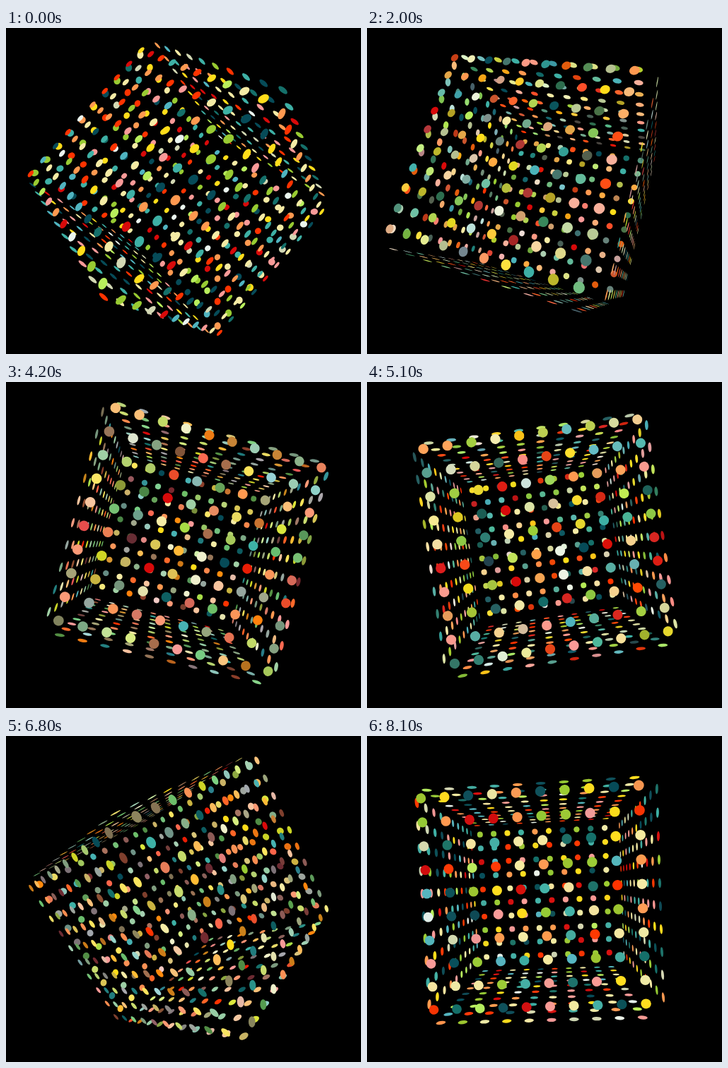
Write an HTML page with a canvas that moves like this. It is 502 px wide and 462 px high and loops after 8200 ms.

```html
<!DOCTYPE html>
<html lang="en">
<head>
<meta charset="utf-8">
<title>Cube of dots</title>
<style>
html, body { margin: 0; width: 100%; height: 100%; overflow: hidden; background: #000; }
canvas { display: block; }
</style>
</head>
<body>
<canvas id="stage" width="502" height="462"></canvas>
<script>
const canvas = document.getElementById('stage');
const ctx = canvas.getContext('2d');

const LOOP = 8200, STEP = 100;
const SWEEP = Math.PI * 1.2;      // angle covered in one loop
const FADES = 3;                  // colour changes per loop
const CX = canvas.width / 2, CY = canvas.height / 2;
const FOCAL = 475, DIST = 19.2;   // lengths in units of the dot spacing
const HALF = 5.2, RADIUS = 0.21, SIDE = 10;
const SHIFT = [-0.22, -0.17, 0];  // the grids sit slightly off the middle of each face

const PALETTE = [
  '#ff3300', '#ff3300', '#d80a0a', '#ffdd1a', '#ffdd1a', '#ff9950', '#ff9950',
  '#f99a98', '#f99a98', '#f5eba5', '#f5eba5', '#f5eba5', '#d3d8b4', '#98cb32', '#98cb32',
  '#b8ee5c', '#3eb0a5', '#3eb0a5', '#15706a', '#064b58', '#064b58', '#50b4c0', '#eaf5ee'
].map(hex => [1, 3, 5].map(i => parseInt(hex.slice(i, i + 2), 16)));

let seed = 20177;
function random() {
  seed = (seed * 1664525 + 1013904223) % 4294967296;
  return seed / 4294967296;
}
const pick = () => PALETTE[Math.floor(random() * PALETTE.length)];

// Each dot has a centre, the two axes of its face and one colour per fade.
const dots = [];
for (let axis = 0; axis < 3; axis++) {
  const u = (axis + 1) % 3, v = (axis + 2) % 3;
  for (const side of [-HALF, HALF]) {
    for (let i = 0; i < SIDE; i++) {
      for (let j = 0; j < SIDE; j++) {
        const pos = [];
        pos[axis] = side;
        pos[u] = i - (SIDE - 1) / 2 + SHIFT[u];
        pos[v] = j - (SIDE - 1) / 2 + SHIFT[v];
        dots.push({ pos, u, v, colors: Array.from({ length: FADES }, pick) });
      }
    }
  }
}

// Images of the x, y and z axes after turning by -a about z, then a about y, then a about x.
function basis(a) {
  const s = Math.sin(a), c = Math.cos(a);
  return [
    [c * c, -s * c + s * s * c, -s * s - s * c * c],
    [s * c, c * c + s * s * s, s * c - s * s * c],
    [s, -s * c, c * c]
  ];
}

function mix(from, to, k) {
  return 'rgb(' + from.map((n, i) => Math.round(n + (to[i] - n) * k)).join(',') + ')';
}

function draw(time) {
  const p = time / LOOP;
  const axes = basis(SWEEP * (1 - p));
  const stage = Math.floor(p * FADES), fade = p * FADES - stage;

  ctx.resetTransform();
  ctx.fillStyle = '#000';
  ctx.fillRect(0, 0, canvas.width, canvas.height);

  for (const dot of dots) {
    dot.view = [0, 1, 2].map(k =>
      dot.pos[0] * axes[0][k] + dot.pos[1] * axes[1][k] + dot.pos[2] * axes[2][k]);
  }
  dots.sort((a, b) => b.view[2] - a.view[2]);

  for (const { view: [x, y, z], u, v, colors } of dots) {
    const depth = z + DIST, scale = FOCAL / depth;
    const flat = ([ax, ay, az]) =>
      [scale * (ax - az * x / depth), scale * (ay - az * y / depth)];
    ctx.setTransform(...flat(axes[u]), ...flat(axes[v]), CX + x * scale, CY + y * scale);
    ctx.fillStyle = mix(colors[stage], colors[(stage + 1) % FADES], fade);
    ctx.beginPath();
    ctx.arc(0, 0, RADIUS, 0, Math.PI * 2);
    ctx.fill();
  }
}

const start = performance.now();
function tick() {
  const time = Math.max(0, performance.now() - start) % LOOP;
  draw(Math.floor(time / STEP) * STEP);
  requestAnimationFrame(tick);
}
tick();
</script>
</body>
</html>
```
